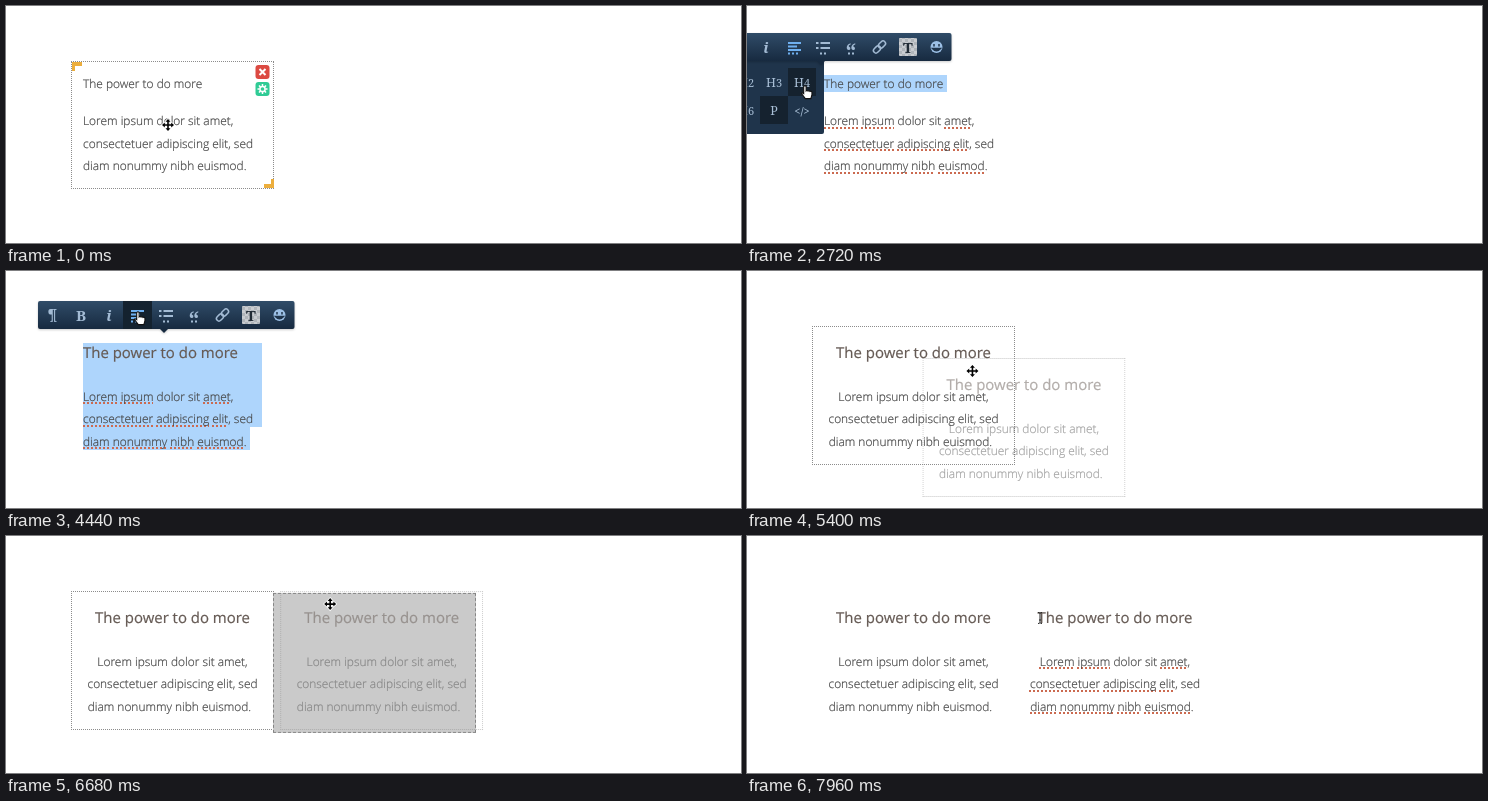
Recreate the animation shown at these times as an HTML page. Size 735 px wide and 237 px high, loop 8000 ms.

```html
<!DOCTYPE html>
<html lang="en">
<head>
<meta charset="utf-8">
<title>Inline text editor</title>
<style>
html, body { margin: 0; width: 100%; height: 100%; overflow: hidden; background: #fff; }
#stage { position: relative; width: 735px; height: 237px; overflow: hidden; }
#stage * { box-sizing: border-box; }
#stage div, #stage svg { position: absolute; overflow: visible; }

/* One percent of the loop is 80 ms. */
.step { animation: 8s step-end infinite; }

/* Text boxes */
.box { top: 55px; width: 203px; height: 139px; }
.a { left: 65px; }
.b { left: 267px; }
.b .copy { left: -.5px; }
.frame { inset: 0; border: 1px dotted #8c8c8c; }
.tools { inset: 0; }
.tools svg { left: 0; top: 0; }
.corner { width: 10px; height: 9px; border: solid #ecae3d; border-width: 4px 0 0 3px; left: 1px; top: 1px; }
.corner + .corner { left: auto; top: auto; right: 0; bottom: 1px; transform: rotate(180deg); }
h4, p {
  position: absolute; left: 12px; width: 179px; margin: 0;
  white-space: nowrap; text-align: center;
  text-rendering: geometricPrecision; -webkit-text-stroke-width: .2px;
}
h4 { top: 16px; font: 400 14.95px/22.4px "Open Sans", sans-serif; color: #655a54; }
p { top: 59.8px; font: 300 11.92px/22.4px "Open Sans", sans-serif; color: #444; }
u { text-decoration: underline dotted 2px transparent; text-underline-offset: 1.5px; text-decoration-skip-ink: none; }

.a { animation-name: height; }
.a h4 { animation: heading 8s step-end infinite; }
.a p { animation: body 8s step-end infinite; }
.a u { animation: spell-a 8s step-end infinite; }
.b u { animation: spell-b 8s step-end infinite; }
.a .frame { animation-name: frame-a; }
.a .tools { animation-name: tools-a; }
.b .frame, .b .tools { animation-name: frame-b; }
.b .copy { animation-name: copy-b; }

@keyframes height { 0% { height: 128px } 38%, 100% { height: 139px } }
@keyframes heading {
  0% { top: 11.5px; font-size: 11.92px; font-weight: 300; color: #444; text-align: left }
  38% { top: 16px; font-size: 14.95px; font-weight: 400; color: #655a54; text-align: left }
  62%, 100% { top: 16px; font-size: 14.95px; font-weight: 400; color: #655a54; text-align: center }
}
@keyframes body {
  0% { top: 49.3px; text-align: left }
  38% { top: 59.8px; text-align: left }
  62%, 100% { top: 59.8px; text-align: center }
}
@keyframes spell-a {
  0%, 64.5%, 100% { text-decoration-color: transparent }
  11% { text-decoration-color: #cb6a50 }
}
@keyframes spell-b {
  0% { text-decoration-color: transparent }
  95.5%, 100% { text-decoration-color: #cb6a50 }
}
@keyframes frame-a {
  0%, 64.5% { visibility: visible }
  9.5%, 86%, 100% { visibility: hidden }
}
@keyframes tools-a {
  0%, 64.5% { visibility: visible }
  9.5%, 65.5%, 100% { visibility: hidden }
}
@keyframes frame-b {
  0%, 95.5%, 100% { visibility: hidden }
  91.5% { visibility: visible }
}
@keyframes copy-b {
  0% { opacity: 0 }
  86% { opacity: .53 }
  91%, 100% { opacity: 1 }
}

/* Text selection */
#selection { inset: 0; background: #aed5fc; animation-name: selection; }
@keyframes selection {
  0%, 43.5%, 64.5%, 100% { clip-path: path("M0 0Z") }
  12% { clip-path: path("M137 69H148V86H137Z") }
  13% { clip-path: path("M77 69H200V86H77Z") }
  38% { clip-path: path("M77 72H236V94H77Z") }
  48.5% { clip-path: path("M77 72H256V156H244V179H77Z") }
  62% { clip-path: path("M77 72H256V156H249V179H77Z") }
}

/* Toolbar and menus */
svg text { font-family: "Noto Serif", serif; text-anchor: middle; }
#bar { left: 0; top: 0; animation-name: bar; filter: drop-shadow(0 1px 1px #0003); }
#bar .hover { animation-name: align-hover; }
@keyframes bar {
  0%, 100% { visibility: hidden; transform: translate(14px, 27px) }
  12% { visibility: visible; transform: translate(14px, 27px) }
  13% { visibility: visible; transform: translate(-52px, 27px) }
  38% { visibility: visible; transform: translate(-52px, 30px) }
  43.5% { visibility: hidden; transform: translate(-52px, 30px) }
  48.5% { visibility: visible; transform: translate(32px, 30px) }
  64.5% { visibility: hidden; transform: translate(32px, 30px) }
}
@keyframes align-hover {
  0%, 62.5%, 100% { visibility: hidden }
  54% { visibility: visible }
}
#levels { left: -49px; top: 55px; animation: levels 8s linear infinite; }
#levels .hover { animation-name: level-hover; }
@keyframes levels {
  0%, 21%, 39%, 100% { opacity: 0 }
  24%, 38.5% { opacity: 1 }
}
@keyframes level-hover {
  0%, 39%, 100% { visibility: hidden }
  31.5% { visibility: visible }
}
#aligns { left: 117px; top: 58px; animation-name: aligns; }
@keyframes aligns {
  0%, 62.5%, 100% { visibility: hidden }
  56.5% { visibility: visible }
}

/* Dragging */
#drop {
  left: 267px; top: 0; width: 203px; height: 140px;
  background: #cacaca; border: 1px dashed #858585;
  animation: drop 8s ease-in-out infinite, drop-shown 8s step-end infinite;
}
@keyframes drop {
  0%, 70.5% { transform: translateY(106px) }
  74% { transform: translateY(108px) }
  79% { transform: translateY(92px) }
  81% { transform: translateY(91px) }
  84%, 100% { transform: translateY(55px) }
}
@keyframes drop-shown {
  0%, 86%, 100% { visibility: hidden }
  68% { visibility: visible }
}
#ghost { left: -50px; top: -13px; opacity: .5; animation-name: ghost; }
@keyframes ghost {
  0%, 86%, 100% { visibility: hidden }
  65.5% { visibility: visible }
}

/* Pointer */
#pointer { left: 0; top: 0; animation: pointer 8s ease-in-out infinite; }
#pointer svg { left: 0; top: 0; }
@keyframes pointer {
  0% { transform: translate(162px, 119px) }
  9.5% { transform: translate(140px, 76px) }
  11%, 14% { transform: translate(138px, 73px) }
  20.5%, 27% { transform: translate(-20px, 44px) }
  33%, 38% { transform: translate(60px, 86px) }
  46%, 48.5% { transform: translate(190px, 118px) }
  54.5%, 56.5% { transform: translate(134px, 47px) }
  59.5%, 62.5% { transform: translate(160px, 73px) }
  65.5% { transform: translate(115px, 68px) }
  69%, 70.5% { transform: translate(291px, 119px) }
  74% { transform: translate(322px, 121px) }
  79%, 81% { transform: translate(327px, 105px) }
  84%, 91% { transform: translate(324px, 66px) }
  96.5%, 100% { transform: translate(293px, 82px) }
}
#move { animation-name: move; }
#beam { animation-name: beam; }
#hand { animation-name: hand; }
@keyframes move {
  0%, 64.5% { visibility: visible }
  9.5%, 95.5%, 100% { visibility: hidden }
}
@keyframes beam {
  0%, 16.5%, 51.5% { visibility: hidden }
  9.5%, 41%, 95.5%, 100% { visibility: visible }
}
@keyframes hand {
  0%, 41%, 64.5%, 100% { visibility: hidden }
  16.5%, 51.5% { visibility: visible }
}
</style>
</head>
<body>
<div id="stage">
  <div id="selection" class="step"></div>
  <div class="box a step"><div class="frame step"></div><div class="copy"></div><div class="tools step"></div></div>
  <div id="drop"></div>
  <div class="box b"><div class="frame step"></div><div class="copy step"></div><div class="tools step"></div></div>

  <svg id="levels" width="126" height="73" fill="#a9bfd6">
    <path d="M0 0H126V71a2 2 0 0 1-2 2H0Z" fill="#1f344b"/>
    <rect class="hover step" x="90" y="7" width="28" height="28" fill="#15222f"/>
    <rect x="62" y="35" width="28" height="28" fill="#15222f"/>
    <g id="level-names" font-size="12.5"></g>
  </svg>

  <svg id="aligns" class="step" width="128" height="42" fill="none" stroke="#a9bfd6" stroke-width="2">
    <rect width="128" height="42" rx="2" fill="#1f344b" stroke="none"/>
    <rect x="35" y="7" width="28" height="28" fill="#15222f" stroke="none"/>
    <path d="M15 16h13M15 20h8M15 24h13M15 28h6M43 16h13M45 20h9M43 24h13M46 28h7M71 16h13M76 20h8M71 24h13M78 28h6M99 16h13M99 20h13M99 24h13M99 28h13"/>
  </svg>

  <svg id="bar" class="step" width="256" height="32" fill="#a3bbd4">
    <defs>
      <linearGradient id="navy" x2="0" y2="1"><stop stop-color="#304c68"/><stop offset="1" stop-color="#172a40"/></linearGradient>
      <pattern id="check" width="6" height="6" patternUnits="userSpaceOnUse"><path d="M0 0h6v6H0Z" fill="#c9ccd0"/><path d="M0 0h3v3H0ZM3 3h3v3H3Z" fill="#b0b5ba"/></pattern>
    </defs>
    <path d="M121 27h10l-5 5Z" fill="#172a40"/>
    <rect width="256.5" height="28" rx="2" fill="url(#navy)"/>
    <rect class="hover step" x="85" width="29" height="28" fill="#14222f"/>
    <g font-size="15" font-weight="700">
      <text x="14.5" y="19">¶</text>
      <text x="43" y="19.5">B</text>
      <text x="71" y="19.5" font-style="italic">i</text>
      <text x="156" y="26" font-size="22">“</text>
    </g>
    <g fill="none" stroke-width="2">
      <path d="M93 10h13M93 13.5h9M93 17h13" stroke="#6fb0f0"/>
      <path d="M93 20.5h2m2 0h2m2 0h2" stroke="#6fb0f0"/>
      <path d="M121 10h2.5m2 0h9.5M121 15h2.5m2 0h9.5M125 20.5h2m2 0h2M153 20.5h2m2 0h2" stroke="#a3bbd4"/>
      <g stroke="#a3bbd4" stroke-width="1.5" transform="translate(184.5 14) rotate(-45)">
        <rect x="-7.5" y="-2.5" width="8" height="5" rx="2.5"/>
        <rect x="-.5" y="-2.5" width="8" height="5" rx="2.5"/>
      </g>
    </g>
    <rect x="204" y="5" width="18" height="18" rx="1" fill="url(#check)"/>
    <text x="213" y="19.5" font-size="15" font-weight="700" fill="#222c36">T</text>
    <circle cx="241.5" cy="14" r="6" fill="#9cc0e6"/>
    <path d="M239 11v2.5M244 11v2.5M237.5 15.5q4 4.5 8 0Z" stroke="#1f344b" stroke-width="1.5" fill="#1f344b"/>
  </svg>

  <div id="pointer">
    <div id="ghost" class="box step"><div class="frame"></div><div class="copy"></div></div>
    <svg id="move" class="step" width="1" height="1">
      <path d="M0-6 2.5-3.2H.8V-.8H3.2V-2.5L6 0 3.2 2.5V.8H.8V3.2H2.5L0 6-2.5 3.2H-.8V.8H-3.2V2.5L-6 0-3.2-2.5V-.8H-.8V-3.2H-2.5Z" stroke="#fff" stroke-width="1.5" paint-order="stroke"/>
    </svg>
    <svg id="beam" class="step" width="1" height="1" fill="none">
      <path d="M-2-5.5Q0-5.5 0-4.5Q0-5.5 2-5.5M0-4.5V4.5M-2 5.5Q0 5.5 0 4.5Q0 5.5 2 5.5M-1 2h2" stroke="#222"/>
    </svg>
    <svg id="hand" class="step" width="1" height="1">
      <path transform="scale(1.1)" d="M-3-5q1.200-1.500 2.200 0V-1q1-.9 1.800.2 1-.7 1.700.3 1.300-.6 1.800.7V2.500L3.500 6H-1.500L-5 1.500q0-1.700 2 0Z" fill="#fff" stroke="#111"/>
    </svg>
  </div>
</div>
<script>
const fill = (selector, html) =>
  document.querySelectorAll(selector).forEach(el => { el.innerHTML = html; });

const misspelt = new Set('Lorem ipsum amet consectetuer adipiscing elit diam nonummy nibh euismod'.split(' '));
const lines = [
  'Lorem ipsum dolor sit amet,',
  'consectetuer adipiscing elit, sed',
  'diam nonummy nibh euismod.&nbsp;&nbsp;'
];
const marked = lines.join('<br>').replace(/\w+/g, word => misspelt.has(word) ? `<u>${word}</u>` : word);
fill('.copy', `<h4>The power to do more</h4><p>${marked}</p>`);

const teeth = Array.from({ length: 8 }, (_, i) =>
  `<path d="M0-5V-3" transform="rotate(${i * 45})"/>`).join('');
fill('.tools', `
  <div class="corner"></div><div class="corner"></div>
  <svg width="203" height="40" fill="none" stroke="#fff" stroke-width="2">
    <rect x="184.5" y="4" width="14" height="14" rx="3" fill="#dc4a42" stroke="none"/>
    <path d="m188.5 8 6 6m0-6-6 6"/>
    <rect x="184.5" y="21" width="14" height="14" rx="3" fill="#2fcb95" stroke="none"/>
    <g transform="translate(191.5 28)" stroke-width="1.5"><circle r="2.6"/>${teeth}</g>
  </svg>`);

const levels = ['H1', 'H2', 'H3', 'H4', 'H5', 'H6', 'P', '&lt;/&gt;'];
fill('#level-names', levels.map((name, i) => {
  const code = name.startsWith('&');
  const label = name.replace(/\d/, '<tspan font-size="11">$&</tspan>');
  return `<text x="${20 + 28 * (i % 4)}" y="${i < 4 ? 26 : 54}"${code ? ' font-size="11" font-weight="700"' : ''}>${label}</text>`;
}).join(''));
</script>
</body>
</html>
```
